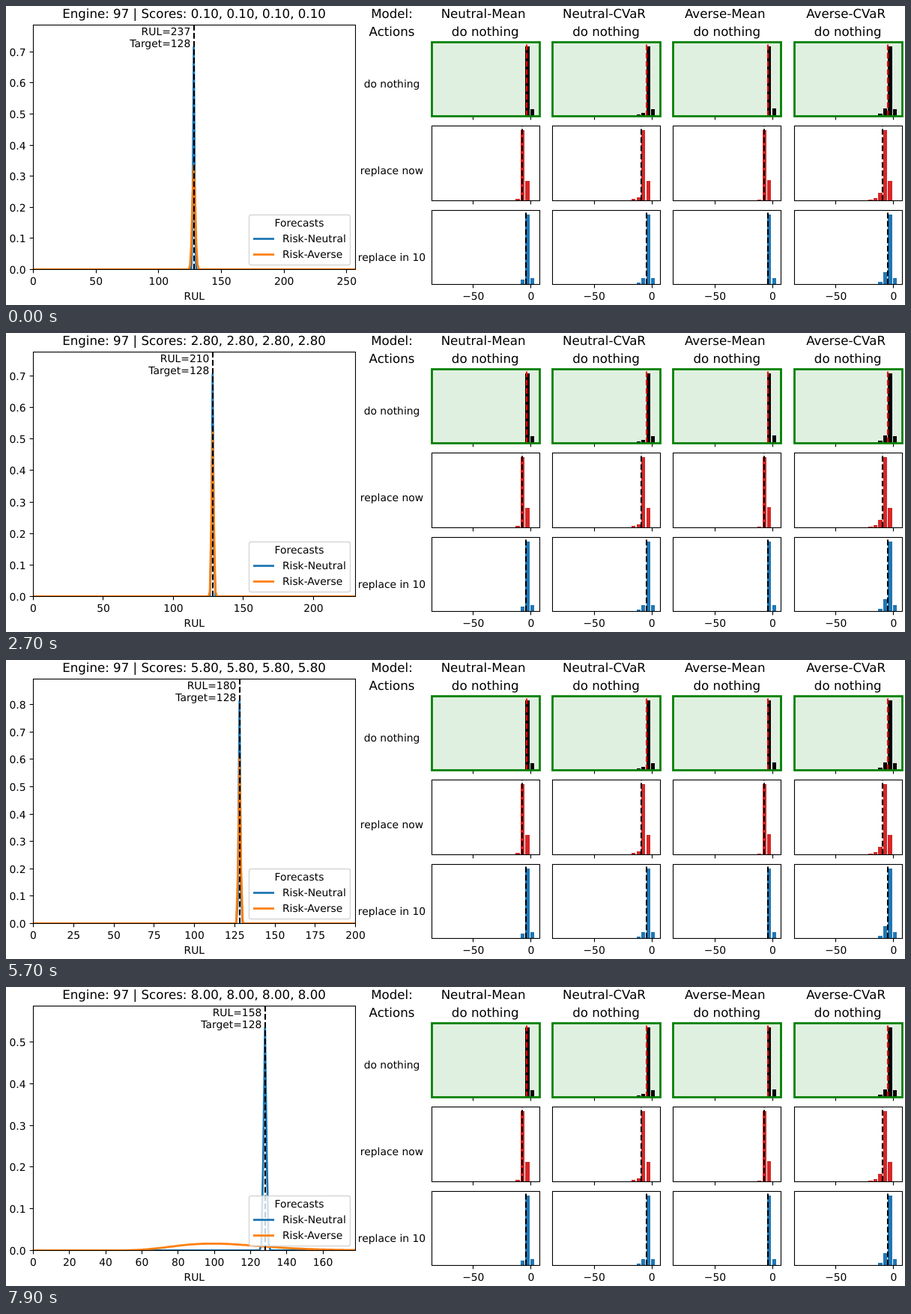
An HTML page for the animation above (8 s loop, 1200 by 400 pixels).

```html
<!DOCTYPE html>
<html lang="en">
<head>
<meta charset="utf-8">
<title>Forecast dashboard</title>
<style>
  html, body { margin: 0; width: 100%; height: 100%; overflow: hidden; background: #fff; }
  svg { display: block; width: 100%; height: 100%; }
  text {
    font: 13.89px "DejaVu Sans", sans-serif; fill: #000; white-space: pre;
    text-rendering: geometricPrecision;
  }
  text.big { font-size: 16.67px; }
</style>
</head>
<body>
<svg id="stage" viewBox="0 0 1200 400"></svg>
<script>
const stage = document.getElementById('stage');
const BLUE = '#1f77b4', ORANGE = '#ff7f0e', RED = '#d62728';
const STEP = 100, COUNT = 80, TARGET = 128;
const BOX = { left: 36.5, right: 466.5, top: 25.5, bottom: 352.5 };

// Centre of the pixel that holds v, for crisp thin lines
const snap = v => Math.floor(v) + 0.5;

function add(tag, attrs, parent = stage) {
  const el = document.createElementNS('http://www.w3.org/2000/svg', tag);
  for (const key in attrs) el.setAttribute(key, attrs[key]);
  parent.appendChild(el);
  return el;
}

function label(str, x, y, anchor = 'middle', cls = '', parent = stage) {
  const el = add('text', { x, y, 'text-anchor': anchor, class: cls }, parent);
  el.textContent = str;
  return el;
}

function line(x1, y1, x2, y2, stroke = '#000', width = 1.11, parent = stage) {
  return add('line', { x1, y1, x2, y2, stroke, 'stroke-width': width }, parent);
}

function dashed(x, from, to, color) {
  const el = line(x, from, x, to, color, 2.08);
  el.setAttribute('stroke-dasharray', '7.7 3.33');
  return el;
}

function frame(x, y, width, height, stroke = '#000', weight = 1.11) {
  return add('rect', { x, y, width, height, fill: 'none', stroke, 'stroke-width': weight });
}

// Forecast chart
const clip = add('clipPath', { id: 'plot' }, add('defs', {}));
add('rect', { x: 36, y: 25, width: 431, height: 328 }, clip);
const curves = add('g', { 'clip-path': 'url(#plot)' });
const [neutral, averse] = [BLUE, ORANGE].map(stroke => add('path', {
  fill: 'none', stroke, 'stroke-width': 2.78, 'stroke-linejoin': 'round'
}, curves));
const marker = dashed(0, BOX.bottom, BOX.top, '#000');
const ticks = add('g', {});
frame(BOX.left, BOX.top, BOX.right - BOX.left, BOX.bottom - BOX.top);
const title = label('', 251, 16, 'middle', 'big');
const rulText = label('', 0, 39, 'end');
const targetText = label('Target=' + TARGET, 0, 55, 'end');
label('RUL', 251.3, 393);

add('rect', {
  x: 324.5, y: 279.5, width: 135, height: 67, rx: 2.8,
  fill: '#fff', 'fill-opacity': 0.8, stroke: '#ccc', 'stroke-opacity': 0.8, 'stroke-width': 1.39
});
label('Forecasts', 391.5, 295);
[['Risk-Neutral', BLUE, 311.5], ['Risk-Averse', ORANGE, 332.5]].forEach(([name, color, y]) => {
  line(330, y, 358, y, color, 2.78);
  label(name, 368.9, y + 4.5, 'start');
});

// Histogram grid
label('Model:', 515, 16, 'middle', 'big');
label('Actions', 515, 40, 'middle', 'big');
label('do nothing', 515, 109);
label('replace now', 515, 225);
label('replace in 10', 515, 341);

const rows = [
  { top: 48.5, bottom: 147.5, color: '#000', dash: '#f00' },
  { top: 160.5, bottom: 260.5, color: RED, dash: '#000' },
  { top: 273.5, bottom: 372.5, color: BLUE, dash: '#000' }
];

// Per row: mean line offset, then bar heights from the rightmost bin leftward
const columns = [
  { name: 'Neutral-Mean',
    data: [[126.5, 9, 93], [120.5, 0, 26, 94, 2], [125.5, 8, 93, 6]] },
  { name: 'Neutral-CVaR',
    data: [[125.5, 9, 93, 4, 2], [118.5, 0, 26, 94, 4, 2], [125.5, 8, 93, 8, 2]] },
  { name: 'Averse-Mean',
    data: [[126.5, 10, 93], [121.5, 0, 27, 94, 1], [126.5, 8, 93]] },
  { name: 'Averse-CVaR',
    data: [[124.5, 9, 93, 10, 3], [117.5, 0, 26, 94, 10, 3, 1], [124.5, 8, 93, 16, 3]] }
];

columns.forEach(({ name, data }, c) => {
  const x0 = 568.2 + 161.33 * c, left = snap(x0);
  label(name, x0 + 68.9, 16, 'middle', 'big');
  label('do nothing', x0 + 71.5, 40, 'middle', 'big');
  rows.forEach(({ top, bottom, color, dash }, r) => {
    const [mean, ...bars] = data[r];
    if (!r) add('rect', { x: left, y: top, width: 144, height: bottom - top, fill: '#e0f0e0' });
    bars.forEach((h, k) => {
      const x = x0 + 131.7 - 6.5 * k, from = Math.round(x);
      add('rect', {
        x: from, y: bottom - h - 0.5, width: Math.round(x + 5.2) - from, height: h + 0.5, fill: color
      });
    });
    dashed(left + mean, bottom, top, dash);
    [55.6, 132.6].forEach(x => line(snap(x0 + x), bottom, snap(x0 + x), bottom + 4.9));
    if (r) frame(left, top, 144, bottom - top);
    else frame(left, top, 144, bottom - top, '#008000', 2.78);
  });
  label('\u221250', x0 + 55.6, 393);
  label('0', x0 + 132.6, 393);
});

// Keys: step, y-axis limit, averse peak, averse mode
const keys = [
  [0, 0.786, 0.335, 128], [8, 0.914, 0.49, 128], [27, 0.776, 0.527, 128],
  [39, 0.695, 0.45, 128], [49, 0.833, 0.597, 128], [66, 0.961, 0.62, 128],
  [79, 0.586, 0.0165, 99]
];

function shapeAt(n) {
  const i = Math.max(1, keys.findIndex(key => key[0] >= n));
  const a = keys[i - 1], b = keys[i];
  const u = (n - a[0]) / (b[0] - a[0]);
  const mix = j => a[j] + (b[j] - a[j]) * u;
  return { yMax: mix(1), peak: a[2] * Math.pow(b[2] / a[2], u), mode: mix(3) };
}

// Log-normal bump; its spread follows from unit area
function curve(peak, mode, xMax, px, py) {
  const spread = 0.399 / (peak * mode);
  let d = '';
  for (let x = 0; x <= xMax; x++) {
    const z = Math.log(Math.max(x, 0.01) / mode) / spread;
    d += (x ? 'L' : 'M') + px(x).toFixed(2) + ' ' + py(peak * Math.exp(-z * z / 2)).toFixed(2);
  }
  return d;
}

function render(n) {
  const rul = 237 - n, xMax = rul + 20;
  const { yMax, peak, mode } = shapeAt(n);
  const px = x => BOX.left + x / xMax * (BOX.right - BOX.left);
  const py = y => BOX.bottom - y / yMax * (BOX.bottom - BOX.top);

  neutral.setAttribute('d', curve(yMax / 1.1, TARGET, xMax, px, py));
  averse.setAttribute('d', curve(peak, mode, xMax, px, py));

  const tx = px(TARGET);
  marker.setAttribute('x1', Math.round(tx));
  marker.setAttribute('x2', Math.round(tx));
  rulText.setAttribute('x', tx - 4.4);
  targetText.setAttribute('x', tx - 4.4);
  rulText.textContent = 'RUL=' + rul;
  const score = ((n + 1) / 10).toFixed(2);
  title.textContent = 'Engine: 97 | Scores: ' + Array(4).fill(score).join(', ');

  ticks.replaceChildren();
  const xStep = [20, 25, 50].find(s => xMax / s <= 9);
  for (let x = 0; x <= xMax; x += xStep) {
    const at = snap(px(x));
    line(at, BOX.bottom, at, BOX.bottom + 4.9, '#000', 1.11, ticks);
    label(x, px(x), 373, 'middle', '', ticks);
  }
  const yStep = yMax <= 0.9 ? 1 : 2;
  for (let i = 0; i / 10 <= yMax; i += yStep) {
    const y = snap(py(i / 10));
    line(BOX.left - 4.9, y, BOX.left, y, '#000', 1.11, ticks);
    label((i / 10).toFixed(1), 26.5, y + 5.5, 'end', '', ticks);
  }
}

let shown = -1;
function tick() {
  const n = Math.floor(performance.now() / STEP) % COUNT;
  if (n !== shown) render(shown = n);
  requestAnimationFrame(tick);
}
tick();
</script>
</body>
</html>
```
